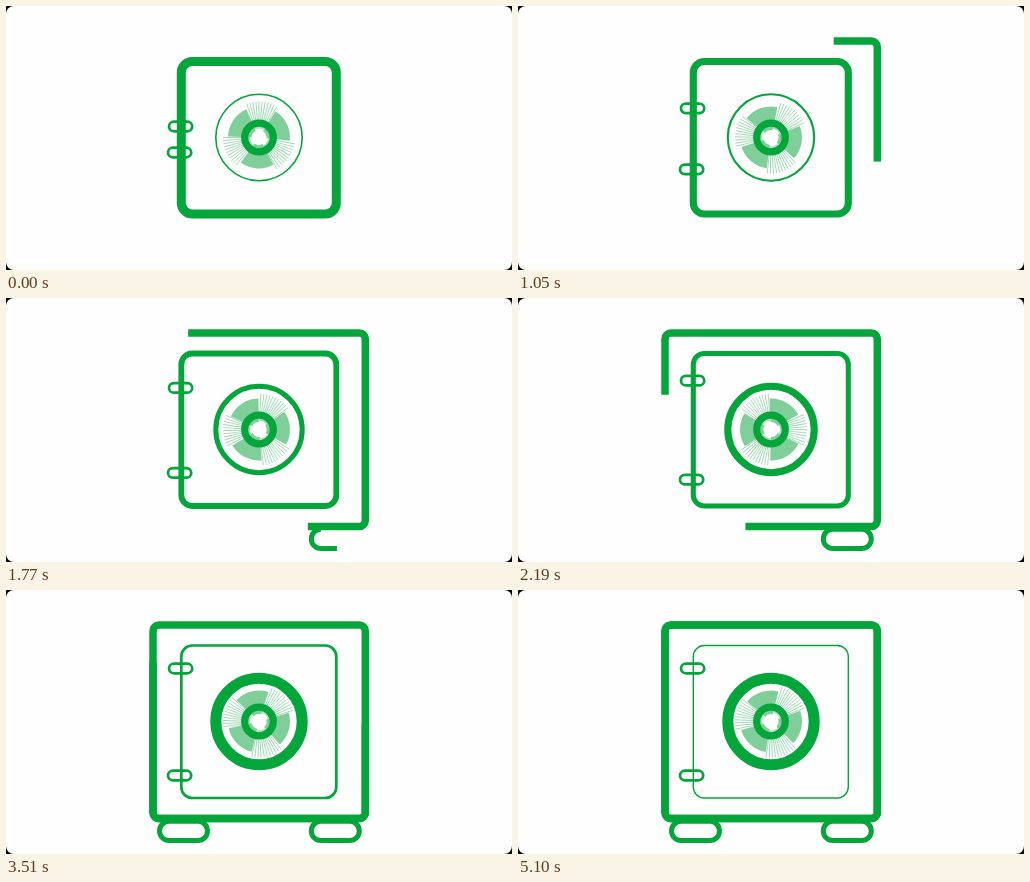
An HTML page with a canvas that plays this animation: 506x264 px, repeating every 5370 ms.

```html
<!DOCTYPE html>
<html lang="en">
<head>
<meta charset="utf-8">
<title>Safe</title>
<style>
  html, body { margin: 0; width: 506px; height: 264px; overflow: hidden; background: #000; }
  canvas { display: block; width: 506px; height: 264px; }
</style>
</head>
<body>
<canvas id="stage"></canvas>
<script>
const W = 506, H = 264, LOOP = 5370, STEP = 30, LAST = 5100;
const GREEN = '#04a53b', WEDGE = '#80cf9b', SPOKE = '#9fd9b4', PAPER = '#fefefe';
const RAD = Math.PI / 180;

const canvas = document.getElementById('stage');
const ctx = canvas.getContext('2d');
const dpr = window.devicePixelRatio || 1;
canvas.width = W * dpr;
canvas.height = H * dpr;

const progress = (t, from, to) => Math.min(1, Math.max(0, (t - from) / (to - from)));
const mix = (a, b, p) => a + (b - a) * p;
const smooth = p => p * p * (3 - 2 * p);

function stroke(width, color = GREEN) {
  ctx.lineWidth = width;
  ctx.strokeStyle = color;
  ctx.stroke();
}

function roundRect(x, y, w, h, r) {
  ctx.beginPath();
  ctx.roundRect(x, y, w, h, r);
}

// Strokes only the first part of the current path
function trace(length, width) {
  if (length <= 0) return;
  ctx.setLineDash([length, 2000]);
  stroke(width);
  ctx.setLineDash([]);
}

// Two lines leave the same point on the right side and run opposite ways round
const SEAM = [359.3, 72], AROUND = 801, SET_OFF = 578;
const CASE = [[359.3, 228.5], [147, 228.5], [147, 35], [359.3, 35]];

function caseLine(corners, length) {
  ctx.beginPath();
  ctx.moveTo(...SEAM);
  corners.forEach((corner, i) => ctx.arcTo(...corner, ...(corners[i + 1] || SEAM), 6));
  ctx.lineTo(...SEAM);
  trace(Math.min(AROUND, length), 7.5);
}

function drawCase(t) {
  const run = Math.max(0, t - SET_OFF);
  caseLine(CASE, AROUND * progress(t, SET_OFF, LAST));
  caseLine([...CASE].reverse(), 0.1625 * run + 1.04e-8 * run ** 3);
}

function foot(x, start, t) {
  const top = 231.3, r = 9.6, w = 48, bottom = top + 2 * r;
  ctx.beginPath();
  ctx.moveTo(x + r, top);
  ctx.arc(x + r, top + r, r, -Math.PI / 2, Math.PI / 2, true);
  ctx.lineTo(x + w - r, bottom);
  ctx.arc(x + w - r, top + r, r, Math.PI / 2, -Math.PI / 2, true);
  ctx.lineTo(x + r, top);
  trace(Math.min(120, (t - start) * 0.2), 5);
}

function hinge(x, y) {
  roundRect(x, y - 4.8, 23.2, 9.6, 4.8);
  stroke(2.7);
}

function circle(r, width) {
  ctx.beginPath();
  ctx.arc(0, 0, r, 0, 2 * Math.PI);
  stroke(width);
}

function dial(t) {
  ctx.save();
  ctx.translate(253, 131.5);
  ctx.save();
  ctx.rotate((96 + 0.1486 * t) * RAD);
  for (let i = 0; i < 3; i++) {
    ctx.beginPath();
    ctx.arc(0, 0, 31, -34 * RAD, 30 * RAD);
    ctx.arc(0, 0, 7.5, 30 * RAD, -34 * RAD, true);
    ctx.fillStyle = WEDGE;
    ctx.fill();
    ctx.beginPath();
    for (let a = 34; a < 86; a += 5) {
      const c = Math.cos(a * RAD), s = Math.sin(a * RAD);
      ctx.moveTo(9 * c, 9 * s);
      ctx.lineTo(36 * c, 36 * s);
    }
    stroke(0.9, SPOKE);
    ctx.rotate(120 * RAD);
  }
  ctx.restore();
  circle(14.3, 7.2);
  circle(43.2, mix(1.6, 11, smooth(progress(t, 650, 3400))));
  ctx.restore();
}

function draw(t) {
  ctx.setTransform(dpr, 0, 0, dpr, 0, 0);
  ctx.fillStyle = '#000';
  ctx.fillRect(0, 0, W, H);
  roundRect(0, 0, W, H, 8);
  ctx.fillStyle = PAPER;
  ctx.fill();

  foot(305.3, 1540, t);
  foot(153.5, 2425, t);
  drawCase(t);

  roundRect(175.3, 55.5, 155, 152.5, 11);
  stroke(mix(9, 1.4, progress(t, 0, 4250)));
  const spread = progress(t, 0, 2430);
  hinge(163, mix(120.5, 78.5, spread));
  hinge(162, mix(146.5, 185.5, spread));
  dial(t);
}

const began = performance.now();

function frame() {
  const t = (performance.now() - began) % LOOP;
  draw(Math.min(LAST, Math.floor(t / STEP) * STEP));
  requestAnimationFrame(frame);
}
frame();
</script>
</body>
</html>
```
